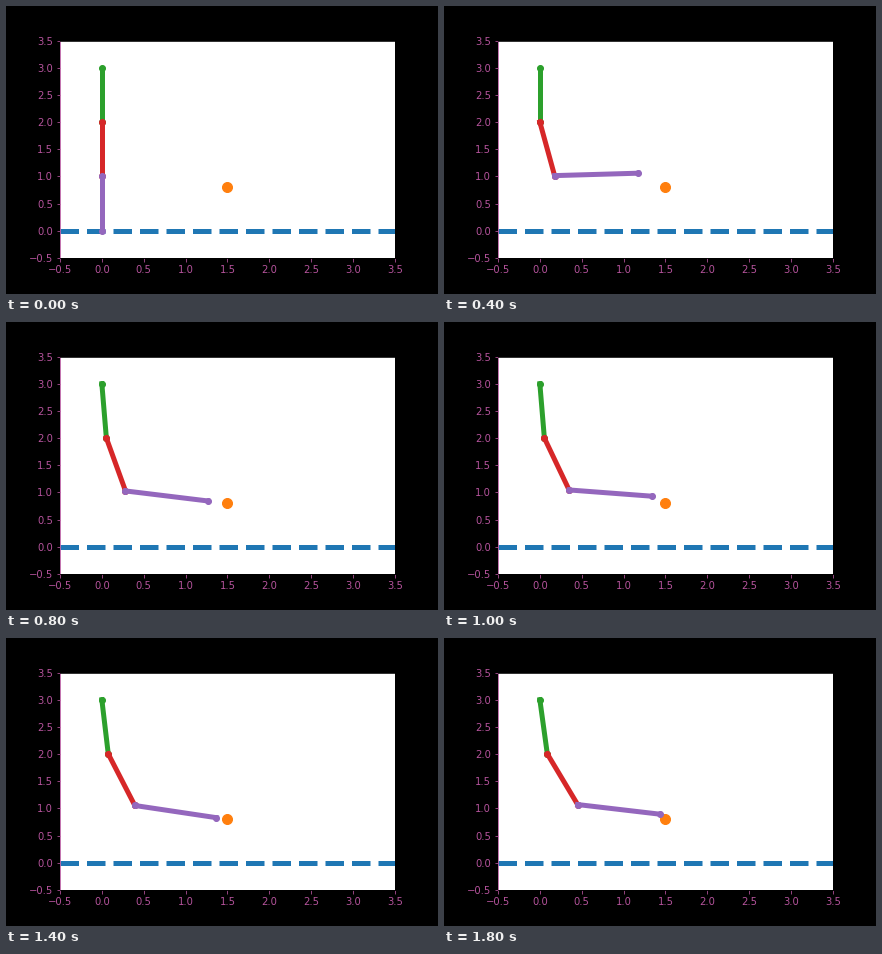
Write a matplotlib script that moves like this. It is 432 px wide and 288 px high and loops after 2000 ms.

```python
import numpy as np
import matplotlib.pyplot as plt
from matplotlib.animation import FuncAnimation

STEPS = 10
LINKS = 3
TARGET = np.array([1.5, 0.8])
INK = "#b5539c"


def heading(v):
    return np.arctan2(v[1], v[0])


def aim(joints, pivot):
    """Turn the chain below a pivot so that its tip points at the target."""
    origin = joints[pivot]
    turn = heading(TARGET - origin) - heading(joints[-1] - origin)
    c, s = np.cos(turn), np.sin(turn)
    moved = joints.copy()
    moved[pivot:] = origin + (joints[pivot:] - origin) @ np.array([[c, s], [-s, c]])
    return moved


# Cyclic coordinate descent: last joint first, then up to the base
poses = [np.array([[0.0, 3.0 - i] for i in range(LINKS + 1)])]
for step in range(STEPS - 1):
    poses.append(aim(poses[-1], LINKS - 1 - step % LINKS))

fig = plt.figure(figsize=(6, 4), dpi=72, facecolor="black")
ax = fig.add_axes([0.125, 0.125, 0.775, 0.755])
ax.set(xlim=(-0.5, 3.5), ylim=(-0.5, 3.5))
ticks = np.arange(-0.5, 3.6, 0.5)
ax.set_xticks(ticks)
ax.set_yticks(ticks)
ax.tick_params(colors=INK, labelsize=10)
ax.spines["left"].set_color(INK)

ax.plot([-0.5, 3.5], [0, 0], "--", color="C0", lw=5)
ax.plot(*TARGET, "o", color="C1", ms=10)
arms = [ax.plot([], [], "o-", color=f"C{i + 2}", lw=5)[0] for i in range(LINKS)]


def draw(frame):
    joints = poses[frame]
    for i, arm in enumerate(arms):
        arm.set_data(joints[i:i + 2].T)
    return arms


anim = FuncAnimation(fig, draw, frames=STEPS, interval=200,
                     init_func=lambda: draw(0), repeat=True, repeat_delay=0)
plt.show()
```
